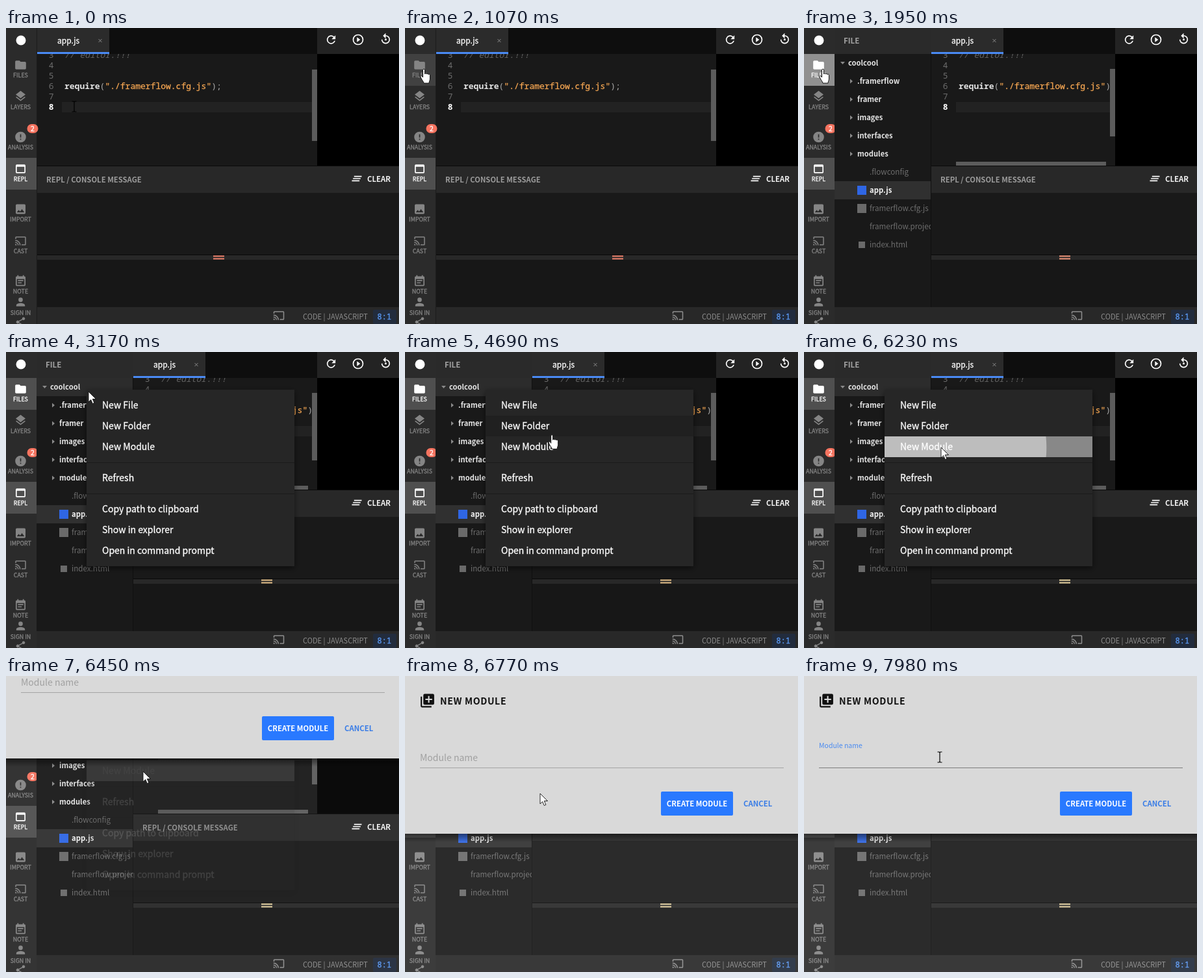
An HTML page that plays this animation: 605x456 px, repeating every 8 s.

```html
<!DOCTYPE html>
<html lang="en">
<head>
<meta charset="utf-8">
<title>New module</title>
<style>
  html, body { margin: 0; width: 100%; height: 100%; overflow: hidden; background: #191919; }
  svg { display: block; width: 605px; height: 456px; }
  text { font-family: "Noto Sans CJK JP", "Noto Sans CJK SC", "Noto Sans", sans-serif; white-space: pre; }
  .mono, .mono tspan { font-family: "Noto Sans Mono", "DejaVu Sans Mono", monospace; }
  .b { font-weight: 700; }
  .m { stroke: currentColor; stroke-width: .3; }
</style>
</head>
<body>
<svg id="stage" viewBox="0 0 605 456" xmlns="http://www.w3.org/2000/svg"></svg>
<script>
const LOOP = 8000;
const stage = document.getElementById('stage');

const ICONS = {
  folder: 'M10 4H4c-1.1 0-2 .9-2 2v12c0 1.1.9 2 2 2h16c1.1 0 2-.9 2-2V8c0-1.1-.9-2-2-2h-8l-2-2z',
  layers: 'M12 18.5l-7.4-5.7L3 14.1l9 7 9-7-1.6-1.3-7.4 5.7zM12 16l7.4-5.7L21 9l-9-7-9 7 1.6 1.3L12 16z',
  alert: 'M12 2a10 10 0 1 0 0 20 10 10 0 0 0 0-20zm1 15h-2v-2h2v2zm0-4h-2V7h2v6z',
  frame: 'M19 4H5a2 2 0 0 0-2 2v12a2 2 0 0 0 2 2h14a2 2 0 0 0 2-2V6a2 2 0 0 0-2-2zm0 14H5V8h14v10z',
  image: 'M21 19V5a2 2 0 0 0-2-2H5a2 2 0 0 0-2 2v14a2 2 0 0 0 2 2h14a2 2 0 0 0 2-2zM8.5 13.5l2.5 3 3.5-4.5 4.5 6H5l3.5-4.5z',
  cast: 'M21 3H3a2 2 0 0 0-2 2v3h2V5h18v14h-7v2h7a2 2 0 0 0 2-2V5a2 2 0 0 0-2-2zM1 18v3h3a3 3 0 0 0-3-3zm0-4v2a5 5 0 0 1 5 5h2a7 7 0 0 0-7-7zm0-4v2a9 9 0 0 1 9 9h2a11 11 0 0 0-11-11z',
  note: 'M17 10H7v2h10v-2zm2-7h-1V1h-2v2H8V1H6v2H5a2 2 0 0 0-2 2v14a2 2 0 0 0 2 2h14a2 2 0 0 0 2-2V5a2 2 0 0 0-2-2zm0 16H5V8h14v11zm-5-5H7v2h7v-2z',
  person: 'M12 12a4 4 0 1 0 0-8 4 4 0 0 0 0 8zm0 2c-2.7 0-8 1.3-8 4v2h16v-2c0-2.7-5.3-4-8-4z',
  share: 'M18 2a3 3 0 0 0-2.9 3.7L8 9.8a3 3 0 1 0 0 4.4l7.1 4.1a3 3 0 1 0 .9-1.5l-7.1-4.1v-1.4L16 7.2A3 3 0 1 0 18 2z',
  refresh: 'M17.65 6.35A8 8 0 1 0 19.73 14h-2.08A6 6 0 1 1 16.2 7.8L13 11h7V4l-2.35 2.35z',
  play: 'M10 16.5l6-4.5-6-4.5v9zM12 2a10 10 0 1 0 0 20 10 10 0 0 0 0-20zm0 18a8 8 0 1 1 0-16 8 8 0 0 1 0 16z',
  replay: 'M12 5V1L7 6l5 5V7a6 6 0 1 1-6 6H4a8 8 0 1 0 8-8zm0 6.2a1.8 1.8 0 1 0 0 3.6 1.8 1.8 0 0 0 0-3.6z',
  clear: 'M5 13h14v-2H5v2zm-2 4h14v-2H3v2zM7 7v2h14V7H7z',
  add: 'M4 6H2v14a2 2 0 0 0 2 2h14v-2H4V6zm16-4H8a2 2 0 0 0-2 2v12a2 2 0 0 0 2 2h12a2 2 0 0 0 2-2V4a2 2 0 0 0-2-2zm-1 9h-4v4h-2v-4H9V9h4V5h2v4h4v2z'
};

// Markup helpers
const rect = (x, y, w, h, fill, more = '') =>
  `<rect x="${x}" y="${y}" width="${w}" height="${h}" fill="${fill}" ${more}/>`;
const text = (x, y, size, fill, str, more = '') =>
  `<text x="${x}" y="${y}" font-size="${size}" fill="${fill}" color="${fill}" ${more}>${str}</text>`;
const icon = (name, cx, cy, fill, size = 20, more = '') =>
  `<path d="${ICONS[name]}" fill="${fill}" fill-rule="evenodd" transform="translate(${cx - size / 2} ${cy - size / 2}) scale(${size / 24})" ${more}/>`;
const BOLD = 'class="b"', MID = 'class="m"';

function editor() {
  const nums = [3, 4, 5, 6, 7].map(n =>
    text(73.5, n * 16 - 2, 13, '#6c6c6c', n, 'class="mono" text-anchor="end"')).join('');
  return rect(86, 114, 400, 16, '#222') + nums +
    text(73.5, 126, 13, '#fff', 8, 'class="mono b" text-anchor="end"') +
    text(90, 46, 13, '#636363', '// editor.!!!', 'class="mono" font-style="italic"') +
    text(90, 94, 13, '#aaa', '<tspan class="b" fill="#e4e4e4">require</tspan>(' +
      '<tspan class="m" fill="#f3a552" color="#f3a552">"./framerflow.cfg.js"</tspan>);', 'class="mono"') +
    rect(90, 114, 2, 16, '#ddd', 'id="caret"') +
    rect(48, 0, 440, 40, '#0e0e0e') + rect(48, 0, 111, 40, '#2b2b2b') + rect(48, 37, 111, 3, '#4a8af4') +
    text(79, 24, 12, '#fff', 'app.js', MID) +
    '<path d="M142.500 17l5 5m0-5l-5 5" stroke="#8a8a8a"/>';
}

function consoleArea() {
  return rect(47, 212, 558, 1, '#0a0a0a') + rect(47, 213, 558, 41, '#282828') +
    '<g class="shift">' + text(62, 238, 11.3, '#9b9b9b', 'REPL / CONSOLE MESSAGE', BOLD) + '</g>' +
    icon('clear', 540, 232, '#fff') + text(556, 237, 11.4, '#f2f2f2', 'CLEAR', BOLD) +
    rect(47, 254, 558, 95, '#191919') + rect(47, 349, 558, 1, '#080808') +
    rect(47, 350, 558, 7, '#282828') + rect(47, 357, 558, 73, '#171717') +
    '<path id="grip" d="M319 351.500h17M319 355.500h17" stroke-width="2"/>' +
    rect(47, 430, 558, 26, '#282828') + icon('cast', 420, 443, '#8f8f8f', 18) +
    text(457, 449, 11.1, '#8d8d8d', 'CODE | JAVASCRIPT') +
    rect(565, 434, 36, 22, '#222c3d', 'rx="2"') +
    text(571.5, 449, 12, '#5b9bf8', '8:1', 'class="mono m"');
}

function rail() {
  const items = [
    ['folder', 57, 'FILES', 76], ['layers', 105, 'LAYERS', 125], ['alert', 168, 'ANALYSIS', 187],
    ['frame', 217, 'REPL', 236], ['image', 279, 'IMPORT', 298], ['cast', 328, 'CAST', 347],
    ['note', 390, 'NOTE', 409], ['person', 422, 'SIGN IN', 442]
  ];
  return rect(0, 0, 47, 456, '#2b2b2b') + rect(47, 0, 1, 456, '#1c1c1c') +
    rect(0, 200, 47, 49, '#4f4f4f') + rect(0, 40, 47, 49, '#fff', 'id="filesBg"') +
    '<circle id="filesRipple" cx="29" cy="64" fill="#fff" clip-path="url(#filesClip)"/>' +
    '<circle cx="23" cy="19" r="7.5" fill="#fff"/>' +
    items.map(([name, y, label, base], i) => {
      const c = i === 3 ? '#fff' : '#858585';
      const g = icon(name, 22.5, y, c, name === 'cast' ? 18 : 20) +
        text(22.5, base, 8.9, c, label, 'class="m" text-anchor="middle"');
      return i ? g : `<g id="filesItem">${g}</g>`;
    }).join('') +
    icon('share', 22.5, 453, '#858585', 18) +
    rect(32.5, 148, 17, 14, '#f6735f', 'rx="7"') +
    text(41, 159, 10.5, '#fff', '2', 'class="m" text-anchor="middle"');
}

function tree() {
  const folders = ['.framerflow', 'framer', 'images', 'interfaces', 'modules'];
  const files = [['.flowconfig', 222], ['framerflow.cfg.js', 278], ['framerflow.project', 306], ['index.html', 334]];
  return '<g clip-path="url(#panelClip)">' +
    rect(47, 0, 149, 456, '#191919') + rect(47, 0, 149, 40, '#2a2a2a') + rect(47, 430, 149, 26, '#282828') +
    rect(47, 40, 148, 28, '#2c2c2c', 'id="rootHover"') + rect(47, 236, 148, 28, '#303030') +
    text(61, 24, 11.6, '#a2a2a2', 'FILE', BOLD) +
    '<path d="M56 52h7l-3.500 4z" fill="#8a8a8a"/>' + text(68, 58, 11.2, '#e4e4e4', 'coolcool', BOLD) +
    folders.map((f, i) => {
      const y = 82 + i * 28;
      return `<path d="M71 ${y - 3.5}v7l4-3.500z" fill="#8a8a8a"/>` + text(82, y + 4, 11.2, '#e4e4e4', f, BOLD);
    }).join('') +
    files.map(([f, y]) => text(101, y + 4, 11.65, '#6e6e6e', f)).join('') +
    text(101, 254, 11.3, '#f4f4f4', 'app.js', BOLD) +
    rect(82, 243, 14, 14, '#2f66e4') + rect(82, 271, 14, 14, '#6a6a6a') + rect(84, 329, 10, 10, '#6a6a6a') +
    rect(195, 40, 1, 390, '#101010') + '</g>';
}

function menu() {
  const items = [['New File', 82], ['New Folder', 114], ['New Module', 146], ['Refresh', 194],
    ['Copy path to clipboard', 242], ['Show in explorer', 274], ['Open in command prompt', 306]];
  return '<g id="menu">' + rect(124, 58, 320, 272, '#272727', 'filter="url(#shadow)"') +
    rect(124, 66, 320, 32, '#202020', 'id="itemHover"') +
    rect(124, 130, 320, 32, '#888', 'id="itemBg"') +
    '<circle id="itemRipple" cx="211" cy="147" fill="#bdbdbd" clip-path="url(#itemClip)"/>' +
    rect(124, 170, 320, 1, '#1a1a1a') + rect(124, 218, 320, 1, '#1a1a1a') +
    items.map(([s, y]) => text(148, y + 5, 14, '#fff', s, MID)).join('') + '</g>';
}

function dialog() {
  return rect(0, 0, 605, 456, '#fff', 'id="scrim"') +
    '<g id="dialog">' + rect(0, 243, 605, 13, 'url(#fade)') + rect(0, -20, 605, 263, '#d9d9d9') +
    icon('add', 34.5, 38, '#111', 25) +
    text(54, 44, 14.2, '#111', 'NEW MODULE', 'class="b" letter-spacing=".6"') +
    rect(23, 141, 560, 1, '#a4a4a4', 'id="line"') +
    text(0, 0, 14, '#a0a0a0', 'Module name', 'id="label"') +
    rect(394, 178, 111, 37, '#2979ff', 'rx="2"') +
    text(449.500, 201, 11.3, '#fff', 'CREATE MODULE', 'class="b" text-anchor="middle"') +
    text(521, 201, 11.4, '#3a7de6', 'CANCEL', BOLD) + '</g>';
}

const cursors =
  '<g id="mouse">' +
  '<path id="ibeam" d="M-3.500 -8h2.500l1 1 1 -1h2.500M0 -7v14M-3.500 8h2.500l1 -1 1 1h2.500" fill="none" stroke="#000" stroke-width="1.2"/>' +
  '<path id="arrow" d="M0 0v16l3.700-3.500 2.600 6 2.600-1.100-2.600-5.900h5.200z" fill="#fff" stroke="#111" stroke-width=".9"/>' +
  '<path id="hand" transform="translate(-5.500 0)" d="M4 1.500C4 0 7 0 7 1.500V8c0-1.500 2.600-1.400 2.800 0 .2-1 2.400-.8 2.600.6.600-.8 2.600-.6 2.600 1.200V15c0 3-1.500 4-1.500 7h-8C5 19 1.500 16 .6 12.500 0 11 1.800 10 2.800 11.200L4 13z" fill="#fff" stroke="#111"/>' +
  '</g>';

stage.innerHTML =
  `<defs>
    <clipPath id="filesClip">${rect(0, 40, 47, 49, '#000')}</clipPath>
    <clipPath id="itemClip">${rect(124, 130, 320, 32, '#000')}</clipPath>
    <clipPath id="panelClip">${rect(47, 0, 0, 456, '#000', 'id="panelBox"')}</clipPath>
    <linearGradient id="fade" x2="0" y2="1"><stop stop-opacity=".5"/><stop offset="1" stop-opacity="0"/></linearGradient>
    <filter id="shadow" x="-10%" y="-10%" width="120%" height="125%">
      <feDropShadow dx="0" dy="3" stdDeviation="5" flood-opacity=".5"/>
    </filter>
  </defs>` +
  rect(0, 0, 605, 456, '#191919') + `<g class="shift">${editor()}</g>` +
  rect(471, 64, 8, 110, '#5c5c5c', 'id="vbar"') + rect(234, 206, 231, 6, '#5c5c5c', 'id="hbar"') +
  rect(479, 40, 126, 172, '#000') + rect(479, 0, 126, 40, '#232323') +
  icon('refresh', 500.5, 18, '#fff') + icon('play', 542, 18, '#fff') + icon('replay', 584.5, 17, '#fff') +
  consoleArea() + rail() + tree() + menu() + dialog() + cursors;

const el = {};
stage.querySelectorAll('[id]').forEach(n => el[n.id] = n);
const shifted = stage.querySelectorAll('.shift');
const set = (id, attrs) => { for (const k in attrs) el[id].setAttribute(k, attrs[k]); };
const show = (id, on) => set(id, { visibility: on ? 'visible' : 'hidden' });

// Timing helpers
const ramp = (t, a, b) => Math.min(1, Math.max(0, (t - a) / (b - a)));
const easeOut = u => 1 - (1 - u) * (1 - u);
const mix = (a, b, u) => a + (b - a) * u;

// The picture refreshes in bursts: first change, last change, count
const BURSTS = [[0, 0, 1], [420, 420, 1], [630, 1070, 5], [1400, 1950, 6], [2170, 2730, 6], [3170, 3170, 1],
  [4260, 4910, 7], [5130, 5130, 1], [5790, 5790, 1], [6010, 6770, 8], [7200, 7980, 8]];
function held(t) {
  const [a, b, n] = BURSTS.filter(s => s[0] <= t).pop();
  if (n === 1) return a;
  const step = (b - a) / (n - 1);
  return a + Math.min(n - 1, Math.floor((t - a) / step + .05)) * step;
}

const PATH = [[0, 105, 121], [520, 105, 121], [1070, 29, 63], [2060, 29, 63], [2730, 127, 61], [4150, 127, 61],
  [4690, 226, 127], [4800, 233, 140], [4910, 217, 144], [5130, 215, 145], [5790, 211, 147],
  [6450, 211, 147], [6770, 208, 181], [7090, 208, 181], [7640, 209, 125], [8000, 209, 125]];
function pointer(t) {
  const i = PATH.findIndex(k => k[0] > t);
  const [a, b] = [PATH[i - 1], PATH[i]];
  const u = ramp(t, a[0], b[0]);
  return [mix(a[1], b[1], u), mix(a[2], b[2], u)];
}
function pointerKind(t, x, y) {
  if (t >= 6010) return t > 7000 && y < 142 ? 'ibeam' : 'arrow';
  if (t >= 3170) return t > 4200 ? 'hand' : 'arrow';
  if (x < 47) return 'hand';
  return t < 1100 && x > 85 ? 'ibeam' : 'arrow';
}

function draw(now) {
  const t = held(now);
  const [x, y] = pointer(t);
  const kind = pointerKind(t, x, y);
  set('mouse', { transform: `translate(${x.toFixed(1)} ${y.toFixed(1)})` });
  for (const k of ['ibeam', 'arrow', 'hand']) show(k, k === kind);
  show('caret', t >= 420 && t < 950);

  // Side panel
  const open = 148 * easeOut(ramp(t, 1420, 1840));
  shifted.forEach(g => g.setAttribute('transform', `translate(${open} 0)`));
  set('panelBox', { width: open > 0 ? open + 1 : 0 });
  set('vbar', open > 60 ? { y: 63, height: 104 } : { y: 64, height: 110 });
  show('hbar', open > 100);
  set('grip', {
    transform: `translate(${open / 2} 0)`,
    stroke: t < 1400 ? '#f0826c' : t < 3170 ? '#ee9478' : t < 6010 ? '#e2bd88' : '#e6d2a0'
  });

  // Files button
  const lit = t >= 1400;
  const overFiles = x < 47 && y < 89;
  const wave = ramp(t, 1400, 1800), fade = 1 - ramp(t, 1950, 2600);
  set('filesBg', { 'fill-opacity': lit ? .17 + .14 * fade : overFiles ? .1 : 0 });
  set('filesRipple', { r: 50 * wave, 'fill-opacity': .24 * fade });
  el.filesItem.querySelectorAll('*').forEach(n => {
    n.setAttribute('fill', lit ? '#fff' : '#858585');
    n.setAttribute('color', lit ? '#fff' : '#858585');
  });
  show('rootHover', t > 2300 && t < 6300);

  // Context menu
  const row = Math.floor((y - 66) / 32);
  const pressed = t >= 6010;
  show('menu', t >= 3170 && t < 6480);
  set('menu', { opacity: 1 - ramp(t, 6300, 6467) });
  set('itemHover', { y: 66 + row * 32, 'fill-opacity': t > 4200 && row >= 0 && row < 3 ? 1 : 0 });
  set('itemBg', { 'fill-opacity': pressed ? 1 : 0 });
  set('itemRipple', { r: pressed ? 164 * (t - 5950) / 280 : 0 });

  // Dialog
  const drop = easeOut(ramp(t, 6300, 6770));
  show('dialog', drop > 0);
  set('dialog', { transform: `translate(0 ${Math.round(-242 * (1 - drop))})` });
  set('scrim', { 'fill-opacity': .08 * drop });
  const up = easeOut(ramp(t, 7640, 7900));
  const tint = [[160, 75], [160, 139], [160, 240]].map(([a, b]) => Math.round(mix(a, b, up)));
  set('label', {
    transform: `translate(23 ${mix(131, 111, up)}) scale(${mix(1, .75, up)})`,
    fill: `rgb(${tint})`
  });
  set('line', { fill: up > 0 ? '#7c7c7c' : '#a4a4a4' });
}

const start = performance.now();
function tick() {
  draw((performance.now() - start) % LOOP);
  requestAnimationFrame(tick);
}
tick();
</script>
</body>
</html>
```
